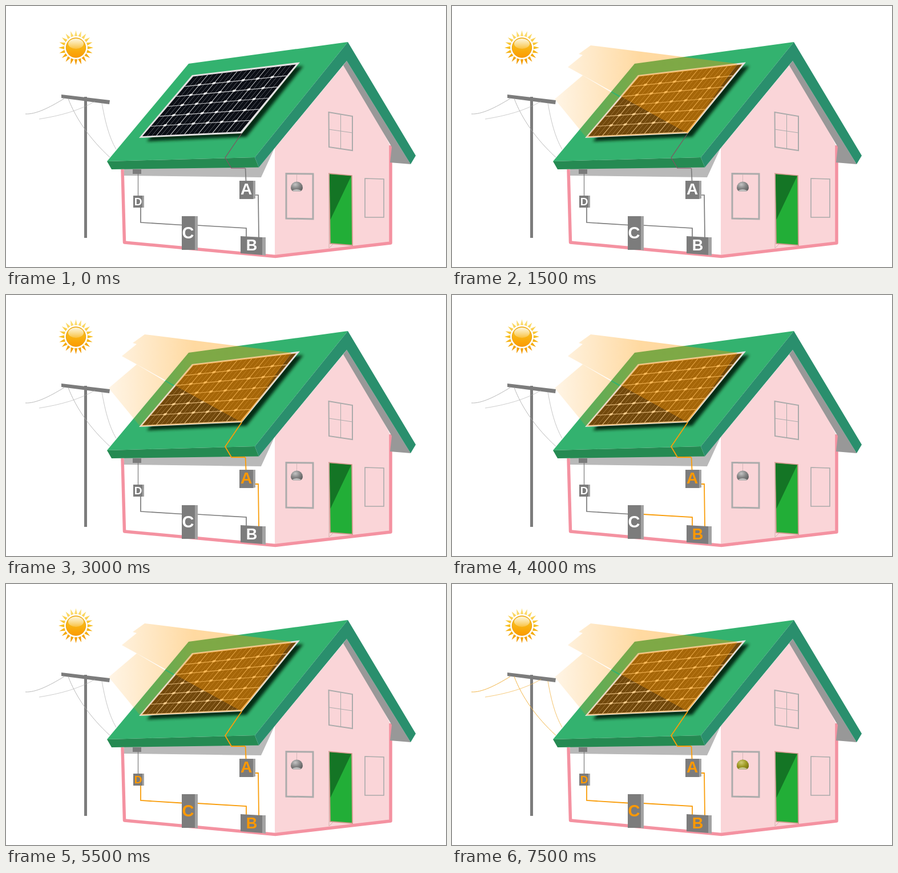
Recreate the animation shown at these times as an HTML page. Size 771 by 457 pixels, loop 8 s.

```html
<!DOCTYPE html>
<html lang="en">
<head>
<meta charset="utf-8">
<title>Solar house</title>
<style>
html, body { margin: 0; width: 100%; height: 100%; overflow: hidden; background: #fff; }
svg { display: block; }
text { font-family: "Liberation Sans", Arial, sans-serif; font-weight: bold; text-anchor: middle; fill: #fff; }
text.on { fill: #f90; }
.wire { fill: none; stroke: #7b7b7b; stroke-width: 1.7; }
.roof { stroke: #7f5361; stroke-width: 1.2; }
.wire.on { stroke: #f99d0a; stroke-width: 1.8; }
.line { fill: none; stroke: #a6a6a6; stroke-width: .8; }
.line.on { stroke: #f2b548; stroke-width: 1; }
.glow { visibility: hidden; }
.glow.on { visibility: visible; }
.box { fill: #7c7c7c; }
.side { fill: #a3a3a3; }
.frame { fill: none; stroke: #ababab; }
</style>
</head>
<body>
<svg width="771" height="457" viewBox="0 0 771 457">
  <defs>
    <linearGradient id="sun" x1="0" y1="43" x2="0" y2="104" gradientUnits="userSpaceOnUse">
      <stop offset="0" stop-color="#fde588"/><stop offset=".5" stop-color="#f7bd1c"/><stop offset="1" stop-color="#f19400"/>
    </linearGradient>
    <linearGradient id="disc" x1="0" y1="0" x2="0" y2="1">
      <stop offset="0" stop-color="#f5c42c"/><stop offset=".5" stop-color="#f8b414"/><stop offset="1" stop-color="#fc9a00"/>
    </linearGradient>
    <linearGradient id="gloss" x1="0" y1="0" x2="0" y2="1">
      <stop offset="0" stop-color="#fff" stop-opacity=".85"/><stop offset="1" stop-color="#fff" stop-opacity=".2"/>
    </linearGradient>
    <linearGradient id="beam" x1="180" y1="0" x2="330" y2="0" gradientUnits="userSpaceOnUse">
      <stop offset="0" stop-color="#f90" stop-opacity=".1"/><stop offset="1" stop-color="#f90" stop-opacity=".37"/>
    </linearGradient>
    <radialGradient id="gray" cx=".38" cy=".3" r=".8">
      <stop offset="0" stop-color="#c4c4c4"/><stop offset=".5" stop-color="#868686"/><stop offset="1" stop-color="#5b5b5b"/>
    </radialGradient>
    <radialGradient id="olive" cx=".38" cy=".3" r=".8">
      <stop offset="0" stop-color="#d0cc74"/><stop offset=".5" stop-color="#a09b25"/><stop offset="1" stop-color="#77700c"/>
    </radialGradient>
    <filter id="blur"><feGaussianBlur stdDeviation="2.5"/></filter>
  </defs>

  <!-- sun -->
  <path id="rays" fill="url(#sun)"/>
  <circle cx="122.5" cy="73" r="17.2" fill="url(#disc)" stroke="#e99a0a"/>
  <ellipse cx="122.5" cy="66" rx="13.5" ry="9" fill="url(#gloss)"/>

  <!-- power pole -->
  <path class="box" d="M137 159h5v247h-5zM97 155l85 10-1 7-84-11z"/>
  <g id="lines">
    <path class="line" data-t="7500" d="M34 189C52 190 76 178 102 162"/>
    <path class="line" data-t="7500" opacity=".7" d="M58 198C96 192 128 183 156 167"/>
    <path class="line" data-t="7500" d="M109 162C122 197 148 234 182 265"/>
    <path class="line" data-t="7500" opacity=".8" d="M168 170C173 199 180 229 193 251"/>
  </g>

  <!-- walls -->
  <path fill="#b9b9b9" d="M207 284L443 282 470 250 447 300 207 297z"/>
  <path fill="#fad5d8" d="M596 98L471 249V438L674 415V246z"/>
  <path fill="none" stroke="#f492a1" stroke-width="5.5" stroke-linejoin="round" d="M204 286L207.500 414 472 438.500 674 415V244"/>
  <path fill="#fad5d8" d="M471 300h4v135h-4z"/>
  <path fill="#989898" d="M597 96L709 277 673 274 676 247 591 104z"/>

  <!-- windows -->
  <path class="frame" stroke-width="2" d="M565.500 186L607 193V253L566 247z"/>
  <path class="frame" d="M586.500 190V250M566 216L607 222"/>
  <path class="frame" stroke-width="3" d="M491 293.500L538 294V373L491 372z"/>
  <path class="frame" stroke-width="1.600" d="M629 302L662 303V370L629 370z"/>

  <!-- door -->
  <path fill="#22ae37" stroke="#d09a8c" stroke-width="1.800" d="M566 293.500L606 297 607 419 568 416z"/>
  <path fill="#147525" d="M567 294.500L605 297.500 568.500 374z"/>
  <path fill="none" stroke="#d3b3b0" d="M566 294V424L573 417"/>

  <!-- lamp -->
  <path stroke="#d5b9bb" d="M509.500 295V308"/>
  <g id="lamp"></g>

  <!-- roof -->
  <path fill="#33b26f" d="M320 101L599 63 436 265 177 272z"/>
  <path fill="#258a52" d="M177 272L436 265 443 282.500 185 286z"/>
  <path fill="#2a8f6d" d="M599 63L718 262 709 277 597 96 443 282.500 436 265z"/>

  <!-- panel -->
  <path filter="url(#blur)" fill="#04200f" opacity=".92" d="M336 130L521 105 421 229 247 237z"/>
  <path fill="#e4e2e2" d="M326 121L515 98.500 413.500 223 233 231z"/>
  <path fill="#0b0e15" d="M328 123.500L508 102.500 411 220 239 228z"/>
  <path id="bars" fill="none" stroke="#8b8e94" stroke-width=".6"/>
  <path id="grid" fill="none" stroke="#c6c7ca" stroke-width="1.100"/>
  <path id="gems" fill="#f4f4f4"/>

  <!-- sunlight -->
  <g class="glow" data-t="1500">
    <path fill="#f90" opacity=".42" d="M328 122.500L509 101.500 413 222 236 230z"/>
    <path fill="url(#beam)" d="M243 69L500 101 413 223 203 107 229 86 222 84z"/>
    <path fill="url(#beam)" d="M229 121.400L180 163 235 230 294 160z"/>
  </g>

  <!-- wiring -->
  <path class="wire roof" data-t="2000" d="M413 223L384 265.500 395 284H419"/>
  <path class="wire" data-t="2000" d="M419.500 284L420.500 306"/>
  <path class="wire" data-t="3000" d="M436 331H442L443 405"/>
  <path class="wire" data-t="4000" d="M421 404V389L335 384"/>
  <path class="wire" data-t="5000" d="M308 383.500L236 379V352"/>
  <path class="wire" style="stroke-width:1.200" d="M231.500 332V293"/>
  <path class="box" d="M222 286h15v8h-15z"/>

  <!-- devices -->
  <path class="box" d="M409 306h24v32h-24zM411 403L449 405V436L411 433zM308 368h23v59h-23zM223 332h16v21h-16z"/>
  <path class="side" d="M433 306h4v31l-4 1zM449 405h6v32l-6-1zM331 368h5v60l-5-1zM239 332h3v21h-3z"/>
  <text x="421" y="330" font-size="28" data-t="2500">A</text>
  <text x="430.500" y="428" font-size="27" data-t="3500">B</text>
  <text x="319" y="406.500" font-size="29" data-t="4500">C</text>
  <text x="231.500" y="349" font-size="19" data-t="5500">D</text>
</svg>
<script>
const $ = id => document.getElementById(id);
const draw = (id, d) => $(id).setAttribute('d', d);

const polar = (r, a) => `${122.5 + r * Math.sin(a)} ${73 - r * Math.cos(a)}`;
let d = '';
for (let i = 0; i < 20; i++) {
  const a = i * Math.PI / 10;
  d += `M${polar(30.5, a)}L${polar(20.5, a + .13)} ${polar(20.5, a - .13)}z`;
}
draw('rays', d);

// Point on the panel, u across and v down, both 0 to 1
const mix = (a, b, k) => a + (b - a) * k;
const at = (u, v) => [
  mix(mix(328, 508, u), mix(239, 411, u), v),
  mix(mix(123.5, 102.5, u), mix(228, 220, u), v)
];
const seg = (a, b) => `M${a}L${b}`;
const cols = 7, rows = 6;
let bars = '', grid = '', gems = '';
for (let i = 1; i < cols * 3; i++) {
  const s = seg(at(i / cols / 3, 0), at(i / cols / 3, 1));
  if (i % 3) bars += s; else grid += s;
}
for (let j = 1; j < rows; j++) {
  grid += seg(at(0, j / rows), at(1, j / rows));
  for (let i = 1; i < cols; i++) {
    const [x, y] = at(i / cols, j / rows);
    gems += `M${x - 4} ${y + 1}l3-3 5-.5-3 4z`;
  }
}
draw('bars', bars);
draw('grid', grid);
draw('gems', gems);

const dome = (fill, extra) => `<g ${extra}>
  <path fill="${fill}" d="M499 318A10.500 10.500 0 0 1 520 318Q520 322 516 324.500H503Q499 322 499 318z"/>
  <path fill="#fff" opacity=".55" d="M502 323Q509 319 517 323L516 324.500H503z"/></g>`;
$('lamp').innerHTML = dome('url(#gray)', '') + dome('url(#olive)', 'class="glow" data-t="6500"');

const parts = document.querySelectorAll('[data-t]');
const start = performance.now();
function tick() {
  const t = (performance.now() - start) % 8000;
  for (const p of parts) p.classList.toggle('on', t >= +p.dataset.t);
  requestAnimationFrame(tick);
}
tick();
</script>
</body>
</html>
```
